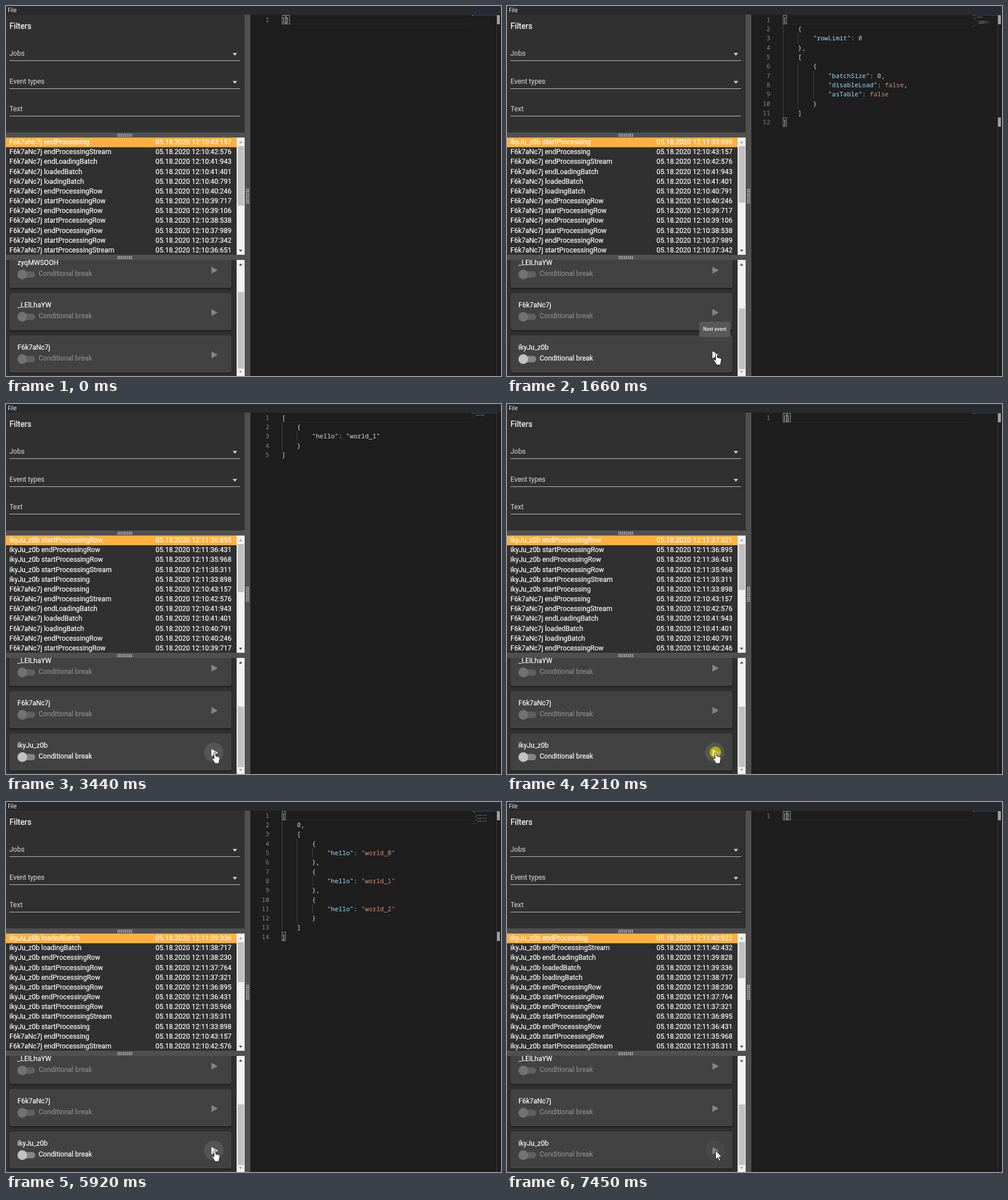
These frames come from a looping animation (865 px wide and 647 px high, 8 s). An HTML page:

```html
<!DOCTYPE html>
<html lang="en">
<head>
<meta charset="utf-8">
<title>Event debugger</title>
<style>
html, body { margin: 0; width: 100%; height: 100%; overflow: hidden; background: #1e1e1e; }
#stage { position: absolute; left: 0; top: 0; width: 865px; height: 647px; overflow: hidden;
  font: 12px/17px Roboto, sans-serif; color: #fff; }
#stage div, #stage svg { position: absolute; }
#menu { width: 865px; height: 15px; background: #282a2f; font: 10px/14px "Open Sans", sans-serif; text-indent: 3px; }
#left { top: 15px; width: 417px; height: 632px; background: #303030; }
#left, #list, #cards { -webkit-text-stroke: .2px; }
.label { left: 6px; color: #c6c6c6; }
.line { left: 6px; width: 403px; height: 1px; background: #bcbcbc; }
.split { background: #505050; }
.dots { background: radial-gradient(circle, #d0d0d0 .9px, transparent 1.3px) 0 0 / 3.4px 3px; }
#list { top: 230px; width: 417px; height: 205px; overflow: hidden; }
.row { left: 0; width: 388px; height: 17px; padding: 0 9px 0 6px; white-space: pre; }
.row.on { background: #ffb041; }
.row span { float: right; }
#cards { top: 444px; width: 417px; height: 203px; overflow: hidden; }
.card { left: 6px; width: 388px; height: 65px; border-radius: 4px; background: #424242;
  box-shadow: 0 2px 2px rgba(0,0,0,.25), 0 1px 3px rgba(0,0,0,.3); }
.card .id { left: 14px; top: 13px; }
.track { left: 16px; top: 36px; width: 29px; height: 11px; border-radius: 6px; background: #606060; }
.knob { left: 14px; top: 33px; width: 17px; height: 17px; border-radius: 50%; background: #727272; }
.cond { left: 51px; top: 32px; color: #8c8c8c; white-space: nowrap; }
.play { left: 353px; top: 28px; width: 11px; height: 12px; background: #858585; clip-path: polygon(0 0, 100% 50%, 0 100%); }
.live .track { background: #858585; }
.live .knob { background: #c2c2c2; }
.live .cond { color: #fff; }
.live .play { background: #fff; }
.bar { left: 403px; top: 0; width: 14px; height: 100%; background: #f1f1f1; }
.thumb { left: 2px; width: 11px; background: #c1c1c1; }
.tri { border: 3.5px solid transparent; border-top-width: 0; border-bottom: 4px solid #505050; left: 4px; }
.tri.down { border-bottom: 0; border-top: 4px solid #505050; }
.tri.off { opacity: .45; }
#ripple { left: 346px; top: 592px; width: 34px; height: 34px; border-radius: 50%; background: #fff; }
#press { left: 354px; top: 599px; width: 20px; height: 20px; border-radius: 50%; background: rgba(235,220,0,.65); }
#tip { left: 336px; top: 552px; width: 54px; height: 27px; border-radius: 3px; background: #595959;
  font: 500 8.5px/27px Roboto, sans-serif; text-align: center; color: #eee; white-space: nowrap; }
#code { left: 0; top: 0; width: 865px; font: 11px/16.3px "Noto Sans Mono", monospace; color: #dcdcdc; }
#code .ln { left: 430px; width: 30px; text-align: right; color: #858585; }
#code .src { left: 482px; white-space: pre; }
.guide { width: 1px; height: 16.4px; background: #404040; }
.match { box-sizing: border-box; width: 7px; height: 16px; border: 1px solid #888; background: rgba(0,100,0,.12); }
.mark { left: 858px; width: 5px; height: 16px; background: #a0a0a0; }
.mini { height: 1px; opacity: .45; }
</style>
</head>
<body>
<div id="stage">
  <div id="menu">File</div>
  <div id="left">
    <div class="label" style="top:12px;font-size:14px;color:#fff">Filters</div>
    <div class="label" style="top:60px">Jobs</div><div class="line" style="top:80px"></div>
    <div class="label" style="top:109px">Event types</div><div class="line" style="top:129px"></div>
    <div class="label" style="top:157px">Text</div><div class="line" style="top:177px"></div>
    <div class="tri down" style="left:395.5px;top:67px;border-width:5px 4.5px 0;border-top-color:#ccc"></div>
    <div class="tri down" style="left:395.5px;top:116px;border-width:5px 4.5px 0;border-top-color:#ccc"></div>
  </div>
  <div id="list"></div>
  <div id="cards"></div>
  <div class="split" style="top:221px;width:417px;height:9px"></div>
  <div class="split" style="top:435px;width:417px;height:9px"></div>
  <div class="split" style="left:417px;top:15px;width:10px;height:632px"></div>
  <div class="dots" style="left:194px;top:223px;width:27.2px;height:6px"></div>
  <div class="dots" style="left:194px;top:437px;width:27.2px;height:6px"></div>
  <div class="dots" style="left:419px;top:319px;width:6px;height:27.2px;background-size:3px 3.4px"></div>
  <div style="left:482px;top:15px;width:326px;height:15px;border:solid #2a2a2a;border-width:1px 0"></div>
  <div style="left:814px;top:15px;width:44px;height:2px;background:#1b3856"></div>
  <div style="left:857px;top:15px;width:1px;height:632px;background:#383838"></div>
  <div id="code"></div>
  <div id="ripple"></div>
  <div id="playTop" class="play" style="left:359px;top:603.5px"></div>
  <div id="press"></div>
  <div id="tip">Next event</div>
  <svg id="cursor" width="18" height="24" style="overflow:visible" stroke="#111" stroke-width=".9" fill="#fff">
    <path id="arrow" d="M0 0V15.5L3.6 12.2 6.2 18.2 8.6 17.1 6 11.3H10.8Z"/>
    <path id="hand" d="M2 1.6C2-.5 5-.5 5 1.6V7.2L10.3 8.4C11.8 8.8 12.3 9.7 12 11.4L11.2 16.4 10.4 20.2H3.4L2.6 17.8-.8 13C-1.8 11.4 0 10 1.2 11.4L2 12.3Z"/>
  </svg>
</div>
<script>
const LOOP = 8000, ROW = 17.18, LINE = 16.3, CHAR = 6.6, PITCH = 74;
const $ = id => document.getElementById(id);
const JOB = "ikyJu_z0b", OLD_JOB = "F6k7aNc7j";
const hello = n => ({ hello: "world_" + n });
const batch = [0, [0, 1, 2].map(hello)];
const config = [{ rowLimit: 0 }, [{ batchSize: 0, disableLoad: false, asTable: false }]];

// click time (null = automatic), arrival time, name, stamp, payload
const events = [
  [null, 500, "startProcessing", "33:898", config],
  [1740, 1900, "startProcessingStream", "35:311", []],
  [2440, 2600, "startProcessingRow", "35:968", [hello(0)]],
  [2910, 2980, "endProcessingRow", "36:431", []],
  [3290, 3440, "startProcessingRow", "36:895", [hello(1)]],
  [3750, 3830, "endProcessingRow", "37:321", []],
  [4210, 4290, "startProcessingRow", "37:764", [hello(2)]],
  [4670, 4750, "endProcessingRow", "38:230", []],
  [5150, 5300, "loadingBatch", "38:717", batch],
  [5760, 5840, "loadedBatch", "39:336", batch],
  [null, 6390, "endLoadingBatch", "39:828", [0]],
  [6840, 6910, "endProcessingStream", "40:432", []],
  [7300, 7450, "endProcessing", "40:922", []]
].map(([click, at, name, stamp, data]) => ({ click, at, name: JOB + " " + name, stamp: "11:" + stamp, data }));

const older = `endProcessing 43:157,endProcessingStream 42:576,endLoadingBatch 41:943,loadedBatch 41:401,
loadingBatch 40:791,endProcessingRow 40:246,startProcessingRow 39:717,endProcessingRow 39:106,
startProcessingRow 38:538,endProcessingRow 37:989,startProcessingRow 37:342,startProcessingStream 36:651`
  .split(",").map(s => {
    const [name, stamp] = s.trim().split(" ");
    return { name: OLD_JOB + " " + name, stamp: "10:" + stamp };
  });
const OLDER_COUNT = 20;

const scrolls = [[0, 0], [1200, 25], [1280, 50], [1360, PITCH]];
const pointer = [
  [0, -50, 0, "arrow"], [900, 408, 619, "arrow"], [980, 385, 599, "arrow"], [1050, 366.5, 583.5, "arrow"],
  [1200, 366, 591, "arrow"], [1280, 365, 600, "arrow"], [1360, 362.5, 607.5, "hand"],
  [2290, 361.5, 608.5, "hand"], [7450, 364.5, 609.5, "arrow"]
];
const at = (table, t) => table.filter(k => k[0] <= t).pop();
const clamp = v => Math.min(1, Math.max(0, v));
const box = (cls, style, text = "") => `<div class="${cls}" style="${style}">${text}</div>`;

const cache = {};
function put(id, html) {
  if (cache[id] !== html) $(id).innerHTML = cache[id] = html;
}

function scrollbar(top, height, h, offUp, offDown) {
  return box("bar", "",
    box("thumb", `top:${top}px;height:${height}px`) +
    box("tri" + (offUp ? " off" : ""), "top:6px") +
    box("tri down" + (offDown ? " off" : ""), `top:${h - 9}px`));
}

function drawList(count) {
  const rows = events.slice(0, count).reverse().concat(older).slice(0, 12);
  const size = 175 * 205 / (ROW * (OLDER_COUNT + count));
  put("list", rows.map((r, i) =>
    box(i ? "row" : "row on", `top:${i * ROW}px`, `<span>05.18.2020 12:${r.stamp}</span>${r.name}`)
  ).join("") + scrollbar(15, size, 205, true, false));
}

function drawCards(t, live) {
  const started = t >= 500, scroll = at(scrolls, t)[1];
  const names = ["zyqMWSOOH", "_LElLhaYW", OLD_JOB].concat(started ? JOB : []);
  const cards = names.map((name, i) =>
    box("card" + (live && i === 3 ? " live" : ""), `top:${-16 + PITCH * i - scroll}px`,
      box("id", "", name) + box("track", "") + box("knob", "") +
      box("cond", "", "Conditional break") + box("play", "")));
  const bar = started
    ? scrollbar(47 + 38 * scroll / PITCH, 106, 203, false, scroll === PITCH)
    : scrollbar(56, 134, 203, false, true);
  put("cards", cards.join("") + bar);
}

function color(token, isKey) {
  if (isKey) return "#9cdcfe";
  if (/^["ft]/.test(token)) return "#ce9178";
  return /^\d/.test(token) ? "#b5cea8" : "#dcdcdc";
}

function drawCode(data, settled) {
  const lines = JSON.stringify(data, null, 4).split("\n");
  let html = "";
  lines.forEach((line, i) => {
    const top = 15.8 + i * LINE, indent = line.search(/\S/);
    for (let c = 0; c < indent; c += 4) html += box("guide", `left:${482 + c * CHAR}px;top:${top}px`);
    const src = line.replace(/"[^"]*"|\w+|[^\s\w]/g, (tok, pos) => {
      const ink = settled ? color(tok, line[pos + tok.length] === ":") : "#dcdcdc";
      html += box("mini", `left:${814 + pos * .86}px;top:${15.5 + i * 1.75}px;width:${tok.length * .86}px;background:${ink}`);
      return `<span style="color:${ink}">${tok}</span>`;
    });
    html += box("ln", `top:${top}px`, i + 1) + box("src", `top:${top}px`, src);
  });
  if (settled) {
    const last = lines.length - 1, end = 15.5 + last * LINE;
    html += box("match", "left:482px;top:16px") +
      box("match", `left:${last ? 482 : 488.5}px;top:${end}px`) +
      box("mark", "top:15.5px") + box("mark", `top:${end}px`);
  }
  put("code", html);
}

function render(t) {
  const count = events.filter(e => e.at <= t).length;
  const now = events[count - 1], before = events[count - 2];
  const data = now ? now.data : [];
  const same = JSON.stringify(data) === JSON.stringify(before ? before.data : []);
  const live = count > 0 && count < events.length;
  drawList(count);
  drawCards(t, live);
  drawCode(data, !now || now.click === null || same || t >= now.at + 70);

  const grow = clamp((t - 1740) / 240);
  $("ripple").style.opacity = t < 1740 ? 0 : live ? .1 : .04;
  $("ripple").style.transform = `scale(${grow})`;
  $("playTop").style.visibility = t >= 1740 ? "visible" : "hidden";
  $("playTop").style.background = live ? "#fff" : "#858585";
  $("press").style.opacity = events.some(e => e.click !== null && t >= e.click && t < e.click + 150) ? 1 : 0;

  const tip = clamp((t - 1470) / 150) * clamp((2060 - t) / 160);
  $("tip").style.opacity = tip;
  $("tip").style.transform = `scale(${.7 + .3 * tip})`;

  const [, x, y, shape] = at(pointer, t);
  $("cursor").style.transform = `translate(${x}px,${y}px)`;
  for (const id of ["arrow", "hand"]) $(id).style.display = id === shape ? "" : "none";
}

const start = performance.now();
function frame() {
  render((performance.now() - start) % LOOP);
  requestAnimationFrame(frame);
}
frame();
</script>
</body>
</html>
```
